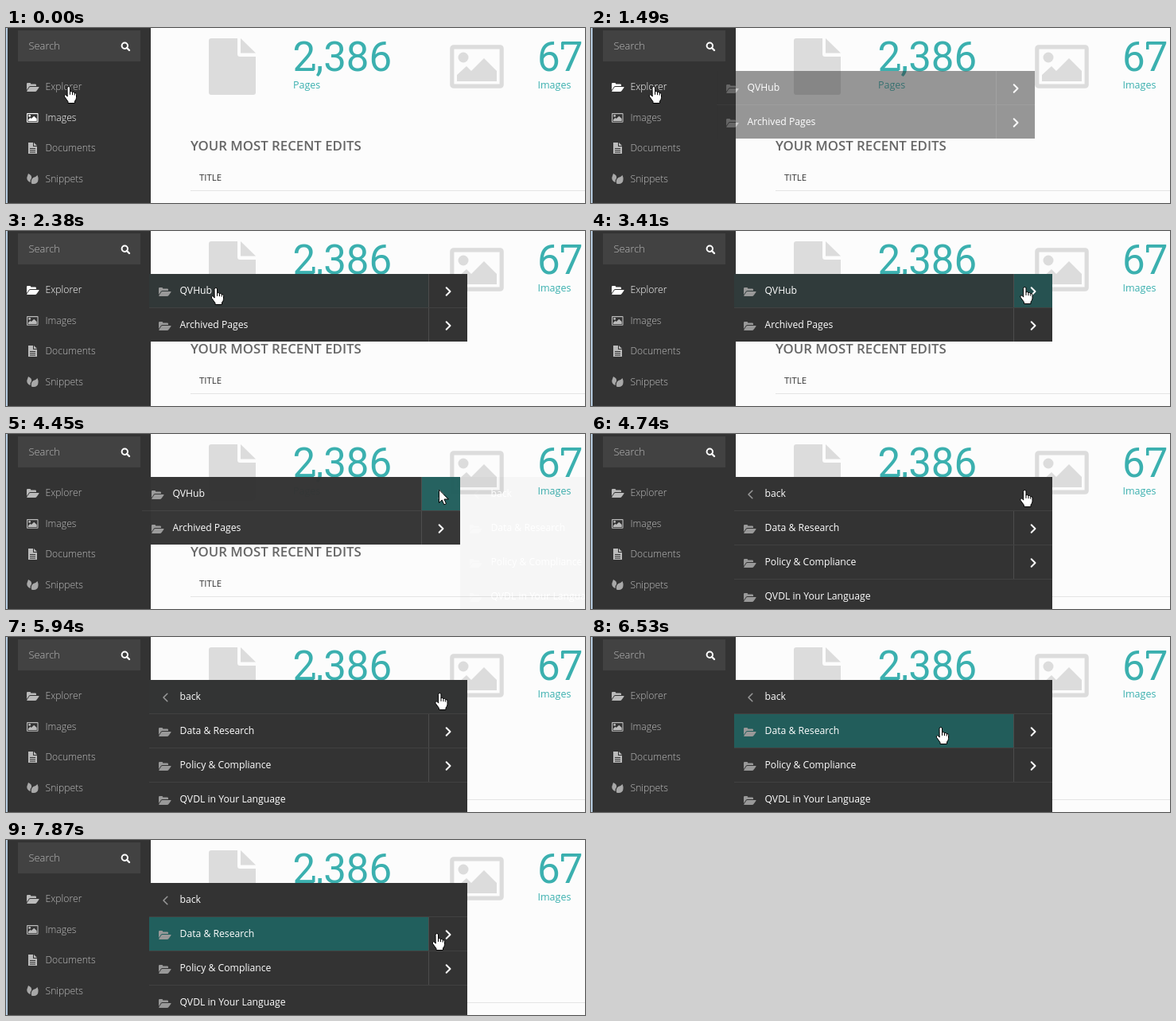
Animation of 728 by 220 pixels, one loop 8000 ms. Source, as an HTML page with a canvas:

```html
<!DOCTYPE html>
<html lang="en">
<head>
<meta charset="utf-8">
<title>Explorer menu</title>
<style>
html, body { margin: 0; width: 100%; height: 100%; overflow: hidden; background: #fcfcfc; }
canvas { display: block; }
</style>
</head>
<body>
<canvas id="stage" width="728" height="220"></canvas>
<script>
const W = 728, H = 220, LOOP = 8000, FIRST = 138, STEP = 148.3;
const MENU_X = 180, MENU_Y = 54, MENU_W = 400, SPLIT = 351, ROW = 43;
const DARK = [51, 51, 51], HOT = [33, 95, 93];
const TEAL = '#3bb0af', PALE = '#dcdcdc', GREY = '#bbb';
const SANS = '"Open Sans", sans-serif', DIGITS = 'Roboto, sans-serif';

const stage = document.getElementById('stage').getContext('2d');
const layer = document.createElement('canvas');
layer.width = W;
layer.height = H;
const sheet = layer.getContext('2d');

const ROOT = [
  { label: 'QVHub', more: true },
  { label: 'Archived Pages', more: true }
];
const CHILDREN = [
  { label: 'back', back: true },
  { label: 'Data & Research', more: true },
  { label: 'Policy & Compliance', more: true },
  { label: 'QVDL in Your Language' }
];

const HOME = { x: 79, y: 73 };
const MOVES = [
  { from: 1790, to: 2362, x: 264, y: 71 },
  { from: 2956, to: 3400, x: 545.5, y: 70 },
  { from: 5922, to: 6515, x: 440, y: 113 },
  { from: 6515, to: 6810, x: 437, y: 117 },
  { from: 7420, to: 7850, x: 542, y: 117 }
];

// The screen refreshes in even steps, so motion is read on that grid.
const snap = t => t < FIRST ? 0 : FIRST + STEP * Math.floor((t - FIRST) / STEP);
const ramp = (t, from, to) => Math.min(1, Math.max(0, (t - from) / (to - from)));
const ease = p => p * p * (3 - 2 * p);
const lerp = (a, b, p) => a + (b - a) * p;
const mix = p => `rgb(${DARK.map((v, i) => Math.round(lerp(v, HOT[i], p)))})`;

function pointer(t) {
  let { x, y } = HOME;
  for (const m of MOVES) {
    const p = ease(ramp(t, m.from, m.to));
    x = lerp(x, m.x, p);
    y = lerp(y, m.y, p);
  }
  return { x, y };
}

function rect(c, x, y, w, h, fill) {
  c.fillStyle = fill;
  c.fillRect(x, y, w, h);
}

function text(c, str, x, y, size, fill, weight = 400, family = SANS) {
  c.font = `${weight} ${size}px ${family}`;
  c.fillStyle = fill;
  c.fillText(str, x, y);
}

function shape(c, x, y, path, fill, line, width = 1) {
  c.save();
  c.translate(x, y);
  c.lineJoin = c.lineCap = 'round';
  const p = new Path2D(path);
  if (fill) { c.fillStyle = fill; c.fill(p); }
  if (line) { c.strokeStyle = line; c.lineWidth = width; c.stroke(p); }
  c.restore();
}

function folder(c, x, y, fill) {
  shape(c, x, y, 'M0 9V1.2Q0 0 1.2 0H4.2Q5.3 0 5.3 1.6H10.8Q12 1.6 12 2.8V4H4.6Q3.5 4 2.8 5Z', fill);
  shape(c, x, y, 'M4.6 5H15Q16 5 15.4 5.9L12.5 10Q11.8 11 10.6 11H.7Q-.2 11 .4 10.1L3.2 5.8Q3.8 5 4.6 5Z', fill);
}

function picture(c, x, y, scale, fill) {
  c.save();
  c.translate(x, y);
  c.scale(scale, scale);
  shape(c, 0, 0, 'M5 2.8H63Q65.2 2.8 65.2 5V50Q65.2 52.2 63 52.2H5Q2.8 52.2 2.8 50V5Q2.8 2.8 5 2.8Z', null, fill, 5.2);
  shape(c, 0, 0, 'M9 46V38L21 27L27 33L43 17L59 33V46Z', fill);
  c.beginPath();
  c.arc(17, 16, 6.5, 0, 7);
  c.fillStyle = fill;
  c.fill();
  c.restore();
}

function chevron(c, x, y, dir, line, width) {
  shape(c, x, y, `M${-2.3 * dir} -4.8L${2.5 * dir} 0L${-2.3 * dir} 4.8`, null, line, width);
}

function drawPage(c) {
  rect(c, 0, 0, W, H, '#fcfcfc');
  shape(c, 255, 13, 'M3 0H36V19.5Q36 23 39 23H59V68Q59 71 56 71H3Q0 71 0 68V3Q0 0 3 0ZM40 0L59 18.5H40Z', PALE);
  picture(c, 558, 21, 1, PALE);
  text(c, '2,386', 360.5, 54, 51, TEAL, 400, DIGITS);
  text(c, '67', 668, 54, 51, TEAL, 400, DIGITS);
  rect(c, 385, 45, 3.5, 8, TEAL);
  rect(c, 698, 18, 3.5, 9, TEAL);
  text(c, 'Pages', 361, 76, 12.5, TEAL);
  text(c, 'Images', 668.5, 76, 12.5, TEAL);
  text(c, 'YOUR MOST RECENT EDITS', 232, 154, 16.8, '#666', 600);
  text(c, 'TITLE', 243, 192, 11.4, '#333');
  rect(c, 232, 204, W - 232, 1, '#e4e4e4');
}

function drawSidebar(c, t) {
  const explorer = t >= 140 && t < 4160 ? '#fff' : GREY;
  const images = t < 140 ? '#fff' : GREY;
  rect(c, 0, 0, 2, H, '#b4c9dd');
  rect(c, 2, 0, 180, H, mix(0));
  rect(c, 15, 3, 154, 39, '#424242');
  text(c, 'Search', 28.5, 27, 12.9, GREY, 300);
  c.beginPath();
  c.arc(149.3, 22.2, 3.7, 0, 7);
  c.strokeStyle = '#fff';
  c.lineWidth = 2;
  c.stroke();
  shape(c, 152, 25, 'M0 0L3 3', null, '#fff', 2.4);

  folder(c, 26, 69, explorer);
  picture(c, 26, 107, .215, images);
  shape(c, 28, 144, 'M0 0H6V5H11V14H0ZM7 0L11 4H7Z', GREY);
  for (let i = 0; i < 3; i++) rect(c, 30, 151 + i * 2.3, 7, 1, mix(0));
  shape(c, 26, 183, 'M2 0Q7 2 6 6Q4 8 4.5 11Q0 9 .3 5ZM13.5 2Q16 8 13 11.5Q10 14 6 12.5Q5 7 8.5 5Q11.5 4.5 13.5 2Z', '#a8a8a8');

  const links = { Explorer: explorer, Images: images, Documents: GREY, Snippets: GREY };
  Object.entries(links).forEach(([label, fill], i) =>
    text(c, label, 49.5, Math.round(78 + i * 38.6), 12.2, fill, 300));
}

// heat[i] holds the highlight of row i and of its arrow cell.
function drawMenu(items, x, alpha, heat) {
  const c = sheet;
  c.clearRect(0, 0, W, H);
  items.forEach((item, i) => {
    const y = MENU_Y + i * ROW, [row, more] = heat[i] || [0, 0];
    if (i) rect(c, x, y - 1, MENU_W, 1, '#414141');
    rect(c, x, y, MENU_W, ROW - 1, mix(row));
    if (item.more) {
      rect(c, x + SPLIT, y, MENU_W - SPLIT, ROW - 1, mix(more));
      rect(c, x + SPLIT, y, 1, ROW - 1, '#4c4c4c');
      chevron(c, x + 376, y + 22, 1, '#fff', 2);
    }
    if (item.back) chevron(c, x + 20.5, y + 22, -1, '#999', 1.5);
    else folder(c, x + 12, y + 17, '#999');
  });
  stage.globalAlpha = alpha;
  stage.drawImage(layer, 0, 0);
  stage.globalAlpha = 1;
  items.forEach((item, i) =>
    text(stage, item.label, x + 38.5, MENU_Y + i * ROW + 25, 12.2, '#fff'));
}

function drawArrow(c, x, y) {
  shape(c, x, y, 'M0 0V16L3.7 12.5L6.3 18.3L9 17.1L6.5 11.5H11.5Z', '#fff', '#000');
}

function drawHand(c, x, y) {
  shape(c, x, y, 'M-2 2Q-2 .5 -.2 .5Q1.5 .5 1.5 2V7Q3 5.8 4.5 7.5Q6 6.8 7.2 8.5Q9.5 8 9.5 10.5V14.5Q9.5 17 7.5 19V21.5H-1V19.5L-5.5 13.3Q-6.3 11.3 -4.5 10.8Q-3.3 10.8 -2 12.8Z', '#fff', '#000');
  shape(c, x, y, 'M1.5 7V10.5M4.5 7.7V10.8M7.2 8.7V11.2', null, '#000');
}

function draw(time) {
  const t = snap(time);
  const open = ramp(t, 1330, 1615);
  const slide = ramp(t, 4395, 4734) ** 1.85;
  const shift = slide * MENU_W;

  drawPage(stage);
  drawSidebar(stage, time);
  if (open && slide < 1) {
    const row = ramp(t, 2290, 2950) - ramp(t, 3040, 3480);
    const more = ramp(t, 3060, 3540);
    drawMenu(ROOT, MENU_X - shift - (1 - open) * 44, open * (1 - slide), [[row, more]]);
  }
  if (slide) {
    const back = .2 * (ramp(t, 5900, 6070) - ramp(t, 6070, 6367));
    const data = ramp(t, 6050, 6540);
    drawMenu(CHILDREN, MENU_X + MENU_W - shift, slide, [[back, 0], [data, 0]]);
  }

  const { x, y } = pointer(t);
  if (slide > 0 && slide < 1) drawArrow(stage, x - 1, y + .5);
  else drawHand(stage, x, y);
}

const start = performance.now();
function tick() {
  draw((performance.now() - start) % LOOP);
  requestAnimationFrame(tick);
}
tick();
</script>
</body>
</html>
```
